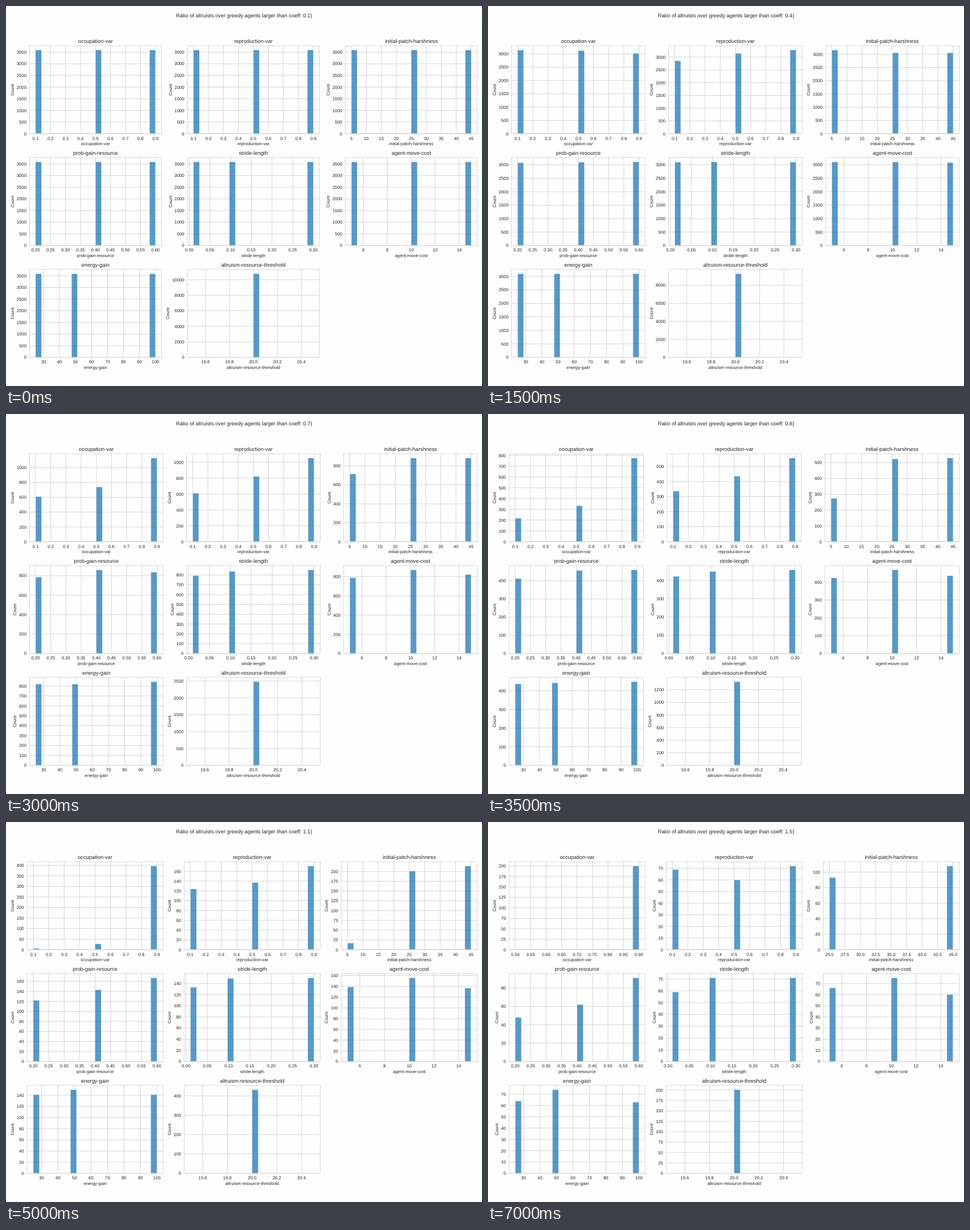
Recreate the animation shown at these times as an HTML page with a canvas. Size 837x669 px, loop 7.5 s.

```html
<!DOCTYPE html>
<html lang="en">
<head>
<meta charset="utf-8">
<title>Agent histograms</title>
<style>
html, body { margin: 0; width: 100%; height: 100%; overflow: hidden; background: #fefefe; }
canvas { display: block; }
</style>
</head>
<body>
<canvas id="stage" width="837" height="669"></canvas>
<script>
const ctx = document.getElementById('stage').getContext('2d');
const STEPS = 15, STEP_MS = 500, BINS = 20;
const PT = .775, SMALL = 10 * PT, LARGE = 12 * PT, DIGIT = .556 * SMALL;
const RIGHT = 828.6, AXIS_H = 154.8, ROW_TOP = 70, ROW_PITCH = 196.9;

// Agents above the threshold at every second step, joined by a smooth curve.
const totalKeys = [10780, 10470, 7240, 2484, 758, 432, 239, 201];

// Each value's weight relative to the last one: even at first, then at 0.5, 0.7 and 1.5.
const weightSteps = [2, 4, 6, 14];
const panels = [
  { name: 'occupation-var', xs: [.1, .5, .9], weights: [[1.1, .54, .0002], [1.08, .655, .004]] },
  { name: 'reproduction-var', xs: [.1, .5, .9], weights: [[.73, .58, .96], [.91, .78, .83]] },
  { name: 'initial-patch-harshness', xs: [5, 25, 45], weights: [[1.08, .81, .0037], [1, 1, .86]] },
  { name: 'prob-gain-resource', xs: [.2, .4, .6], weights: [[.975, .94, .53], [.99, 1.03, .68]] },
  { name: 'stride-length', xs: [.01, .1, .3], weights: [[1, .93, .83], [1.01, .98, 1]] },
  { name: 'agent-move-cost', xs: [5, 10, 15], weights: [[1.02, .96, 1.1], [1.02, 1.06, 1.25]] },
  { name: 'energy-gain', xs: [25, 50, 100], weights: [[1, .97, 1.02], [1, .97, 1.175]] },
  { name: 'altruism-resource-threshold', xs: [20], weights: [] }
];

// Catmull-Rom on the logarithms, halfway between keys on odd steps.
function totalAt(i) {
  const key = k => Math.log(totalKeys[Math.min(k, totalKeys.length - 1)]);
  const k = i >> 1;
  if (i % 2 === 0) return totalKeys[k];
  const outer = key(Math.max(k - 1, 0)) + key(k + 2);
  return Math.round(Math.exp((9 * (key(k) + key(k + 1)) - outer) / 16));
}

function weightAt(list, i) {
  const values = [1, ...list];
  if (i <= weightSteps[0]) return 1;
  const k = weightSteps.findIndex(s => s >= i);
  const u = (i - weightSteps[k - 1]) / (weightSteps[k] - weightSteps[k - 1]);
  return values[k - 1] * (values[k] / values[k - 1]) ** (u ** 1.2);
}

function countsAt(panel, i) {
  const total = totalAt(i);
  const weights = panel.weights.map(list => weightAt(list, i));
  const sum = weights.reduce((a, b) => a + b, 1);
  const counts = weights.map(w => Math.round(total * w / sum));
  return [...counts, total - counts.reduce((a, b) => a + b, 0)];
}

// Ticks on the smallest round step that gives at most nine intervals.
function ticks(lo, hi) {
  const range = hi - lo;
  let step;
  search: for (let e = Math.floor(Math.log10(range)) - 1; ; e++)
    for (const m of [1, 2, 2.5, 5]) {
      step = e < 0 ? m / 10 ** -e : m * 10 ** e;
      if (range / step <= 9) break search;
    }
  const decimals = (String(step).split('.')[1] || '').length;
  const out = [];
  for (let k = Math.ceil(lo / step); k * step <= hi; k++)
    out.push({ value: k * step, label: (k * step).toFixed(decimals) });
  return out;
}

function measure(panel, i) {
  const counts = countsAt(panel, i);
  const used = panel.xs.filter((x, j) => counts[j] > 0);
  let lo = used[0], hi = used[used.length - 1];
  if (lo === hi) { lo -= .5; hi += .5; }
  const pad = (hi - lo) * .05;
  const top = Math.max(...counts) * 1.05;
  const yTicks = ticks(0, top);
  return {
    name: panel.name, xs: panel.xs, counts, lo, hi, top, yTicks,
    x0: lo - pad, x1: hi + pad, xTicks: ticks(lo - pad, hi + pad),
    digits: yTicks[yTicks.length - 1].label.length
  };
}

function text(str, x, y, size, align = 'center') {
  ctx.font = `${size}px "Liberation Sans", Arial, sans-serif`;
  ctx.textAlign = align;
  ctx.fillStyle = '#262626';
  ctx.fillText(str, x, y);
}

function line(x1, y1, x2, y2) {
  ctx.beginPath();
  ctx.moveTo(x1, y1);
  ctx.lineTo(x2, y2);
  ctx.stroke();
}

function drawPanel(p, left, top, width) {
  const bottom = top + AXIS_H, right = left + width, mid = left + width / 2;
  const px = x => left + (x - p.x0) / (p.x1 - p.x0) * width;
  const py = y => bottom - y / p.top * AXIS_H;

  ctx.strokeStyle = '#ccc';
  ctx.lineWidth = PT;
  for (const t of p.xTicks) {
    const x = px(t.value);
    line(x, top, x, bottom);
    text(t.label, x, bottom + 10.7, SMALL);
  }
  for (const t of p.yTicks) {
    const y = py(t.value);
    line(left, y, right, y);
    text(t.label, left - 7 * PT, y + 2.75, SMALL, 'right');
  }

  const binW = (p.hi - p.lo) / BINS;
  ctx.fillStyle = 'rgba(31,119,180,.75)';
  ctx.strokeStyle = '#fff';
  ctx.lineWidth = .5;
  p.xs.forEach((x, j) => {
    if (!p.counts[j]) return;
    const bin = Math.min(BINS - 1, Math.floor((x - p.lo) / binW + 1e-6));
    const a = px(p.lo + bin * binW), w = px(p.lo + (bin + 1) * binW) - a;
    const bar = [a, py(p.counts[j]), w, bottom - py(p.counts[j])];
    ctx.fillRect(...bar);
    ctx.strokeRect(...bar);
  });

  ctx.strokeStyle = '#ccc';
  ctx.lineWidth = PT;
  ctx.strokeRect(left, top, width, AXIS_H);

  text(p.name, mid, top - 4.9, LARGE);
  text(p.name, mid, bottom + 20, SMALL);
  ctx.save();
  ctx.translate(left - 27.4 + (4 - p.digits) * DIGIT, top + AXIS_H / 2);
  ctx.rotate(-Math.PI / 2);
  text('Count', 0, 0, SMALL);
  ctx.restore();
}

function draw(i) {
  ctx.fillStyle = '#fefefe';
  ctx.fillRect(0, 0, 837, 669);
  text(`Ratio of altruists over greedy agents larger than coeff: ${((i + 1) / 10).toFixed(1)})`, 418.5, 20, LARGE);

  // Margins follow the widest count label of their columns.
  const shown = panels.map(p => measure(p, i));
  const margin = test =>
    41.4 + (Math.max(...shown.filter((p, j) => test(j % 3)).map(p => p.digits)) - 4) * DIGIT;
  const left = margin(col => col === 0), gap = margin(col => col > 0);
  const width = (RIGHT - left - 2 * gap) / 3;
  shown.forEach((p, j) =>
    drawPanel(p, left + j % 3 * (width + gap), ROW_TOP + Math.floor(j / 3) * ROW_PITCH, width));
}

ctx.textRendering = 'geometricPrecision';
const start = performance.now();
let current = -1;
function tick() {
  const i = Math.floor((performance.now() - start) / STEP_MS) % STEPS;
  if (i !== current) draw(current = i);
  requestAnimationFrame(tick);
}
tick();
</script>
</body>
</html>
```
